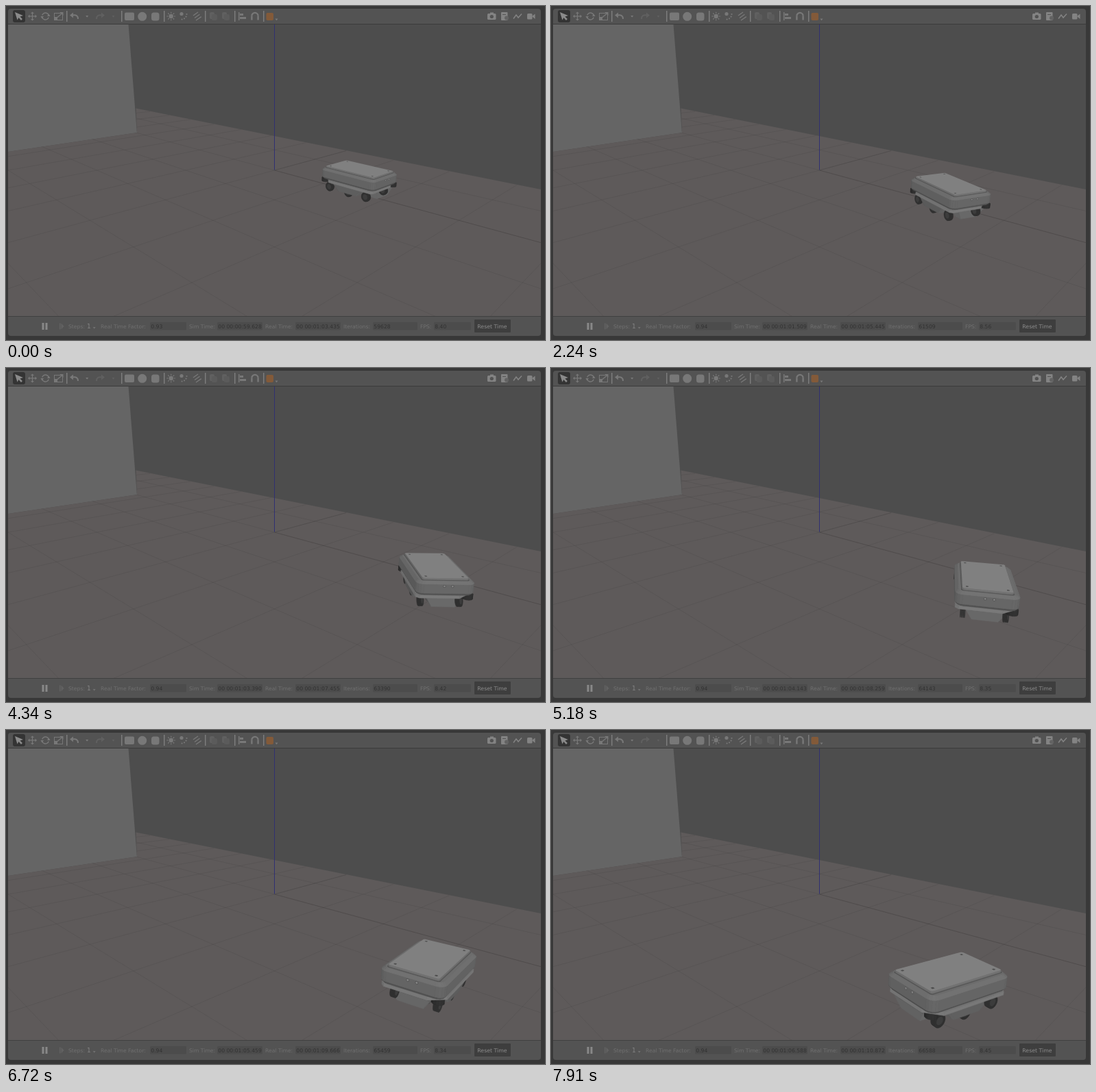
Write an HTML page with a canvas that moves like this. It is 786 px wide and 488 px high and loops after 8000 ms.

```html
<!DOCTYPE html>
<html lang="en">
<head>
<meta charset="utf-8">
<title>Mobile robot simulation</title>
<style>
html, body { margin: 0; width: 786px; height: 488px; overflow: hidden; background: #383838; }
canvas { display: block; width: 786px; height: 488px; }
</style>
</head>
<body>
<canvas id="stage" width="786" height="488"></canvas>
<script>
const g = document.getElementById('stage').getContext('2d');
const LOOP = 8000, TICK = 70, STEP = 118.5, CLOCK = 213.5, R2 = Math.SQRT2, TAU = 2 * Math.PI;
const grey = v => `rgb(${[v, v, v].map(Math.round)})`;
const list = (n, f) => Array.from({ length: n }, (_, i) => f(i));

// The view redraws every STEP ms, shown on the next TICK
const drawTime = i => Math.round(i * STEP / TICK) * TICK;
function lastDraw(t) {
  let i = Math.ceil(t / STEP) + 1;
  while (drawTime(i) > t) i--;
  return drawTime(i);
}

// Constant speed, steadily tightening right turn
const heading = s => -.03 - .1388 * s - .01137 * s * s;
function pose(t) {
  const speed = .35, ds = .01;
  let x = 1.612, y = -.02;
  for (let s = ds / 2; s < t / 1000; s += ds) {
    x += speed * ds * Math.cos(heading(s));
    y += speed * ds * Math.sin(heading(s));
  }
  return { x, y, turn: heading(t / 1000) };
}

// Camera at (5, -5, 2) looking at the world origin
const TILT = Math.atan2(2, 5 * R2), CP = Math.cos(TILT), SP = Math.sin(TILT), FOCAL = 673;
const ahead = (x, y) => (y - x) / R2 + 5 * R2;
const depth = (x, y, z) => ahead(x, y) * CP + (2 - z) * SP;
function project(x, y, z) {
  const k = FOCAL / depth(x, y, z);
  return [391.5 + k * (x + y) / R2, 240 + k * ((2 - z) * CP - ahead(x, y) * SP)];
}

function path(pts) {
  g.beginPath();
  pts.forEach(p => g.lineTo(...p));
  g.closePath();
}
function poly(pts, fill, edge) {
  path(pts);
  g.fillStyle = fill;
  g.fill();
  if (edge) { g.strokeStyle = edge; g.lineWidth = .6; g.stroke(); }
}
function box(x, y, w, h, fill, r = 0) {
  g.beginPath();
  g.roundRect(x, y, w, h, r);
  g.fillStyle = fill;
  g.fill();
}
function disc(x, y, r, fill) {
  g.beginPath();
  g.arc(x, y, r, 0, TAU);
  g.fillStyle = fill;
  g.fill();
}
function arc(x, y, r, from, to, color, width) {
  g.beginPath();
  g.arc(x, y, r, from, to);
  g.strokeStyle = color;
  g.lineWidth = width;
  g.stroke();
}
function line(color, width, ...pts) {
  g.beginPath();
  pts.forEach(p => g.lineTo(...p));
  g.strokeStyle = color;
  g.lineWidth = width;
  g.stroke();
}
function text(s, x, y, fill, size = 7.65) {
  g.font = size + 'px "DejaVu Sans", sans-serif';
  g.fillStyle = fill;
  g.fillText(s, x, y);
}

// ---- world ----
const WALL = 1.91;
function gridLine(at, from, to, alpha) {
  const pts = list(Math.round((to - from) * 10) + 1, i => at(from + i / 10))
    .filter(p => depth(...p, 0) > .3).map(p => project(...p, 0));
  line(`rgba(40,37,37,${alpha})`, .8, ...pts);
}
function world() {
  box(3, 26, 777, 428, '#4d4d4d');
  poly([[3, 27], [178.5, 27], [191, 185], [3, 213]], '#656565');
  const floor = [[3, 213], [191, 185], [189.5, 149.5], [780, 268], [780, 453], [3, 453]];
  poly(floor, '#5e5a5a');
  g.save();
  path(floor);
  g.clip();
  for (let i = -10; i <= 10; i++) {
    gridLine(s => [i, s], -10, WALL, .14);
    if (i < WALL) gridLine(s => [s, i], -10, 10, .14);
  }
  gridLine(s => [s, 0], 0, 10, .22);
  gridLine(s => [0, s], 0, WALL, .15);
  g.restore();
  line('#303072', 1, [391.5, 27], [391.5, 239.5]);
}

// ---- robot ----
// Rounded rectangle with half sides a and b
const outline = (a, b, r) => list(20, i => {
  const q = Math.floor(i / 5), w = (q + i % 5 / 4) * TAU / 4;
  return [(q % 3 ? -1 : 1) * (a - r) + r * Math.cos(w), (q < 2 ? 1 : -1) * (b - r) + r * Math.sin(w)];
});
const ring = (x, y, r, n = 14) => list(n, i => [x + r * Math.cos(i * TAU / n), y + r * Math.sin(i * TAU / n)]);

function robot(t) {
  const { x: cx, y: cy, turn } = pose(t), size = .965;
  const c = Math.cos(turn), s = Math.sin(turn);
  const at = (x, y) => [cx + size * (x * c - y * s), cy + size * (x * s + y * c)];
  const put = (x, y, z) => project(...at(x, y), z);
  const far = (x, y) => depth(...at(x, y), 0);

  function prism(low, z0, high, z1, side, top) {
    low.forEach((p, i) => {
      const j = (i + 1) % low.length, q = low[j];
      const [A, B, C, D] = [put(...p, z0), put(...q, z0), put(...high[j], z1), put(...high[i], z1)];
      if ((C[0] - A[0]) * (D[1] - B[1]) >= (D[0] - B[0]) * (C[1] - A[1])) return;
      const ex = q[0] - p[0], ey = q[1] - p[1], n = Math.hypot(ex, ey) || 1;
      const nx = (ey * c + ex * s) / n, ny = (ey * s - ex * c) / n;
      const col = grey(side + 9 * (nx - ny - 1));
      poly([A, B, C, D], col, col);
    });
    poly(high.map(p => put(...p, z1)), grey(top));
  }
  function wheel([x, y]) {
    const face = (dy, r) => ring(x, .066, r, 20).map(([u, z]) => put(u, y + dy, z));
    const out = far(x, y + .02) < far(x, y - .02) ? .02 : -.02;
    for (let k = -1; k <= 1; k += .5) poly(face(out * k, .06), '#303030', '#303030');
    poly(face(out, .036), '#3c3c3c');
  }

  const casters = [[.28, .2], [.28, -.2], [-.34, .2], [-.34, -.2]];
  const near = p => far(...p) < far(0, 0);
  casters.filter(p => !near(p)).forEach(wheel);
  [[0, .21], [0, -.21]].forEach(wheel);
  const core = outline(.38, .15, .03);
  prism(core, .09, core, .16, 74, 70);
  prism(outline(.16, .25, .02), .055, outline(.25, .265, .02), .155, 94, 88);
  const nose = (x, w) => [[x, -w], [x, w], [.3, w], [.3, -w]];
  prism(nose(.4, .12), .05, nose(.43, .18), .15, 101, 95);
  casters.filter(near).forEach(wheel);
  for (const k of [1, -1]) {
    const laser = ring(.395 * k, .235 * k, .052);
    prism(laser, .145, laser, .195, 46, 50);
  }
  const half = [[.42, -.25], [.42, .15], [.3, .28], [-.39, .28]];
  const skirt = [...half, ...half.map(([x, y]) => [-x, -y])];
  prism(skirt, .148, skirt, .178, 118, 115);

  const full = outline(.445, .29, .07), inner = outline(.42, .262, .06);
  prism(outline(.43, .275, .07), .188, full, .21, 78, 78);
  prism(full, .21, full, .305, 99, 115);
  prism(full, .305, inner, .33, 112, 108);
  const groove = outline(.405, .235, .02), plate = outline(.4, .228, .02);
  prism(groove, .33, groove, .336, 84, 92);
  prism(plate, .336, plate, .352, 112, 128);
  for (const x of [-.35, .35]) for (const y of [-.185, .185])
    poly(outline(.013, .011, .004).map(([u, v]) => put(x + u, y + v, .352)), '#4c4c4c');
  for (const y of [-.02, .06]) {
    const eye = (r, col) => poly(ring(y, .285, r).map(p => put(.446, ...p)), col);
    eye(.015, '#565656');
    eye(.009, '#848484');
  }
}

// ---- toolbar ----
const INK = '#787878', DIM = '#606060', BAR = '#535353';
function turnArrow(x, k, col) {
  poly([[x - 6 * k, 13.5], [x - k, 9.5], [x - k, 17.5]], col);
  g.beginPath();
  g.moveTo(x - 2 * k, 13.5);
  g.quadraticCurveTo(x + 6 * k, 12, x + 6 * k, 19);
  g.strokeStyle = col;
  g.lineWidth = 2;
  g.stroke();
}
const drop = (x, y, col) => poly([[x - 2, y], [x + 2, y], [x, y + 2.7]], col);

function toolbar() {
  box(3, 4, 777, 22, BAR, [4, 4, 0, 0]);
  box(3, 26, 777, 1, '#3b3b3b');
  for (const x of [88, 168, 230, 290, 333, 375]) box(x, 7, 1.5, 16, '#7c7c7c');

  // pointer, move, rotate, scale
  box(10, 6, 18, 18, '#343434', 3);
  poly([[13, 9], [25, 14], [20.5, 15.5], [24, 19], [22, 21], [18.5, 17], [16.5, 20.5]], '#8a8a8a');
  for (let i = 0; i < 4; i++) {
    const u = Math.cos(i * TAU / 4), v = Math.sin(i * TAU / 4);
    const p = (a, b) => [38.5 + a * u - b * v, 15 + a * v + b * u];
    line(INK, 1.3, p(0, 0), p(5, 0));
    poly([p(6.5, 0), p(4, -2.5), p(4, 2.5)], INK);
  }
  for (const a of [.3, .3 + TAU / 2]) arc(57.5, 15, 5, a, a + 2.5, INK, 1.4);
  poly([[50.5, 15], [55, 15], [52.5, 18.5]], INK);
  poly([[60, 15], [64.5, 15], [62.5, 11.5]], INK);
  g.lineWidth = 1;
  g.strokeRect(70.5, 10.5, 12, 10);
  line(INK, 1.4, [72, 19], [81, 11.5]);
  box(70, 16, 5, 5, INK);
  poly([[83.5, 9], [83.5, 14], [78.5, 9]], INK);

  turnArrow(99, 1, INK);
  drop(118.2, 14, INK);
  turnArrow(138, -1, DIM);
  drop(156.5, 14, DIM);

  // shapes and lights
  box(173, 9.5, 14, 11.5, INK, 2);
  disc(198.7, 15.3, 6.5, INK);
  box(212, 9.5, 11.5, 12, INK, 3.5);
  disc(240.7, 15, 3.2, INK);
  for (let i = 0; i < 8; i++) {
    const x = Math.cos(i * TAU / 8), y = Math.sin(i * TAU / 8);
    line(INK, 1.2, [240.7 + 4.3 * x, 15 + 4.3 * y], [240.7 + 6.3 * x, 15 + 6.3 * y]);
  }
  disc(256, 11.5, 2.6, INK);
  for (let i = 0; i < 4; i++) disc(256 + 7.5 * Math.cos(i / 2), 12 + 7.5 * Math.sin(i / 2), 1.1, INK);
  for (let i = 0; i < 3; i++) line(INK, 1.4, [273 + i * 2, 14 + i * 3.5], [280 + i * 2.4, 9 + i * 3.3]);

  // copy, paste, align, snap, view
  for (const x of [297, 315]) {
    box(x, 9, 7, 10, DIM, 2);
    box(x + 3, 12, 8, 9, '#5b5b5b', 2);
  }
  box(339, 9, 1.5, 12, INK);
  box(341, 11, 5, 3, INK);
  box(341, 16, 9, 3, INK);
  arc(363, 14.5, 4.6, TAU / 2, TAU, INK, 2.4);
  box(357.2, 14.5, 2.4, 6, INK);
  box(366.4, 14.5, 2.4, 6, INK);
  box(379.5, 10, 10.5, 11, '#835a39', 2);
  drop(394.5, 18.5, INK);

  // camera, log, plot, video
  const lit = '#838383';
  box(702, 11, 12.5, 9, lit, 1.5);
  box(706, 9.5, 5, 2, lit);
  disc(708.3, 15.5, 2.6, BAR);
  box(722, 9, 9.5, 12, lit, 1);
  box(724, 12, 5, 1, BAR);
  disc(730, 17.5, 3, '#636363');
  line(lit, 1.5, [740, 18.5], [744, 13], [747, 17], [752, 11.5]);
  box(760, 11, 7.5, 8.5, lit, 1.5);
  poly([[767, 15], [771.5, 11.5], [771.5, 19]], lit);
}

// ---- status bar ----
const stamp = s => `00 00:0${Math.floor(s / 60)}:${(s % 60).toFixed(3).padStart(6, '0')}`;
function status(t) {
  const k = Math.floor(t / CLOCK);
  const sim = 59.628 + .18811 * k, real = 63.435 + .201 * k;
  const rate = .94 - .02 * Math.exp(-(((k - 4) / 4) ** 2));
  const fps = 8.44 + .12 * Math.sin((k - 2) / 5.5);
  box(3, 453, 777, 1, '#404040');
  box(3, 454, 777, 28, BAR, [0, 0, 4, 4]);
  for (const x of [52.5, 57.5]) box(x, 463, 3, 10, '#888888');
  box(78, 463.5, 1.5, 9, '#626262');
  poly([[80.5, 463.5], [84.5, 468], [80.5, 472.5]], '#626262');
  text('Steps:', 91, 471, '#707070');
  text('1', 118, 471.3, '#858585', 9);
  drop(128.7, 469, '#707070');
  const field = (label, x, left, w, value) => {
    text(label, x, 471, '#707070');
    box(left, 462, w, 11.5, '#4c4c4c', 1);
    text(value, left + 1.3, 471, '#323232');
  };
  field('Real Time Factor:', 138, 210, 53, rate.toFixed(2));
  field('Sim Time:', 267, 308, 66, stamp(sim));
  field('Real Time:', 378, 422, 66, stamp(real));
  field('Iterations:', 492, 535, 65, Math.round(sim * 1000));
  field('FPS:', 604, 624, 54, fps.toFixed(2));
  box(683, 458, 53, 19, '#3e3e3e', 1);
  text('Reset Time', 687.3, 471, '#8c8c8c', 7.8);
}

let shown = -1;
const start = performance.now();
function frame(now) {
  const t = lastDraw(Math.max(0, now - start) % LOOP);
  if (t !== shown) {
    shown = t;
    box(0, 0, 786, 488, '#383838');
    world();
    robot(t);
    toolbar();
    status(t);
  }
  requestAnimationFrame(frame);
}
frame(start);
</script>
</body>
</html>
```
